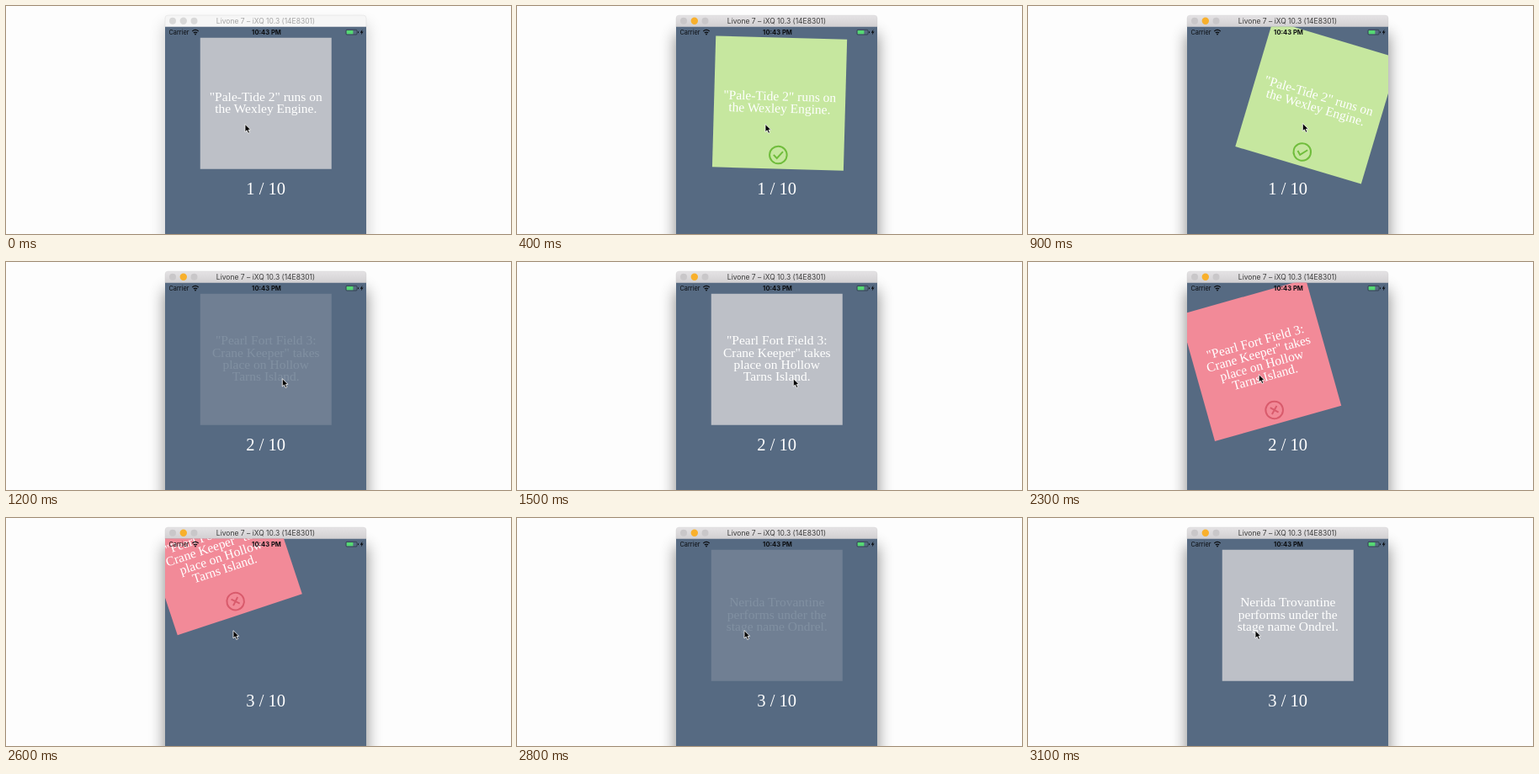
An HTML page that plays this animation: 600x271 px, repeating every 3800 ms.

```html
<!DOCTYPE html>
<html lang="en">
<head>
<meta charset="utf-8">
<title>Swipe quiz</title>
<style>
  html, body { margin: 0; width: 100%; height: 100%; overflow: hidden; background: #fdfdfd; }
  svg { display: block; width: 600px; height: 271px; }
  text { text-anchor: middle; }
  .ui { font-family: Inter, Roboto, sans-serif; }
  .quiz { font-family: "Liberation Serif", "Noto Serif", serif; fill: #fff; }
</style>
</head>
<body>
<svg viewBox="0 0 600 271">
  <defs>
    <filter id="blur" x="-30%" y="-30%" width="160%" height="160%"><feGaussianBlur stdDeviation="9"/></filter>
    <linearGradient id="bar" x2="0" y2="1">
      <stop stop-color="#e5e3e5"/><stop offset="1" stop-color="#d1cfd1"/>
    </linearGradient>
    <clipPath id="screen"><rect x="189" y="24.5" width="239" height="247"/></clipPath>
  </defs>

  <rect id="shadow" x="188" width="241" height="330" filter="url(#blur)"/>
  <path id="titlebar" d="M189 25V14.500q0-3.500 3.500-3.500h232q3.500 0 3.500 3.500V25z" stroke="#c8c8c8" stroke-width=".3"/>
  <circle class="dot" cx="198" cy="17.700" r="4"/>
  <circle class="dot" id="minimize" cx="210.800" cy="17.700" r="4.200"/>
  <circle class="dot" cx="223.500" cy="17.700" r="4"/>
  <text id="title" class="ui" x="308.500" y="21" font-size="8.500">Livone 7 – iXQ 10.3 (14E8301)</text>

  <g clip-path="url(#screen)">
    <rect x="189" y="24.500" width="239" height="247" fill="#566a82"/>
    <text id="counter" class="quiz" x="308.700" y="224" font-size="20.500"></text>
    <g id="card">
      <rect id="face" x="-78" y="-78" width="156" height="156"/>
      <g id="lines" class="quiz" font-size="15.500"></g>
      <g id="badge" transform="translate(0 61.500)" fill="none" stroke-width="2">
        <circle r="10.300"/><path id="mark"/>
      </g>
    </g>
    <g fill="#0b0d10">
      <text class="ui" x="205.500" y="34" font-size="7.400">Carrier</text>
      <text class="ui" x="309.500" y="34.200" font-size="7.600" font-weight="700">10:43 PM</text>
      <path d="M221.300 30q3.700-3.300 7.400 0M222.800 32q2.200-1.900 4.400 0" fill="none" stroke="#0b0d10" stroke-width="1.200"/>
      <circle cx="225" cy="33.500" r=".9"/>
      <rect x="404" y="28.300" width="13" height="5.700" rx="1" fill="none" stroke="#26313d" stroke-width=".7"/>
      <rect x="404.700" y="29" width="7.700" height="4.300" fill="#55d873"/>
      <path d="M418 30v2.300q1-.3 1-1.150t-1-1.150zM423.500 27.800l-2.700 3.900h1.700l-.7 2.800 2.800-3.900h-1.700z"/>
    </g>
  </g>
  <path id="cursor" d="M0 0V9.300L2.200 7.300 3.700 10.800 5.500 10 4 6.700H6.800z" fill="#000" stroke="#fff" stroke-width=".8"/>
</svg>
<script>
const LOOP = 3800, STEP = 100;
const REST = { x: 308.75, y: 115.75 };
const CARDS = [
  ['"Pale-Tide 2" runs on', 'the Wexley Engine.'],
  ['"Pearl Fort Field 3:', 'Crane Keeper" takes', 'place on Hollow', 'Tarns Island.'],
  ['Nerida Trovantine', 'performs under the', 'stage name Ondrel.']
];
// Times are in steps of 100 ms; grabX and grabY are where the drag begins.
const SWIPES = [
  { start: 3, release: 9, grabX: 291.7, grabY: 140.7, dir: 1 },
  { start: 19, release: 25, grabX: 307, grabY: 132.7, dir: -1 }
];
const POINTER = [
  [0, 284, 140.5], [2, 284, 140.5], [4, 295, 140.5], [9, 326.3, 139.5],
  [10, 328.3, 138.7], [19, 328.3, 138.7], [20, 307, 132.7], [23, 274.3, 133.7], [24, 270, 133.7]
];
const LOOKS = {
  0: { face: '#bdc0c7', badge: 'none', mark: '' },
  1: { face: '#c6e79f', badge: '#70bd3c', mark: 'M-5.500 0L-1.500 4 5.500-4' },
  [-1]: { face: '#f28a98', badge: '#d95b6c', mark: 'M-4-4L4 4M4-4L-4 4' }
};

const $ = id => document.getElementById(id);
const clamp = v => Math.min(1, Math.max(0, v));
const set = (el, attrs) => { for (const k in attrs) el.setAttribute(k, attrs[k]); };

function pointerAt(t) {
  const i = POINTER.findIndex(p => p[0] > t);
  if (i < 0) return POINTER[POINTER.length - 1].slice(1);
  const a = POINTER[i - 1], b = POINTER[i], k = (t - a[0]) / (b[0] - a[0]);
  return [1, 2].map(n => a[n] + (b[n] - a[n]) * k);
}

function drawWindow(active) {
  set($('shadow'), { y: active ? 33 : 22, opacity: active ? .43 : .2 });
  set($('titlebar'), { fill: active ? 'url(#bar)' : '#f6f6f6' });
  set($('title'), { fill: active ? '#3c3c3c' : '#a5a5a5' });
  document.querySelectorAll('.dot').forEach(dot => set(dot, { fill: active ? '#c9c7c9' : '#d8d8d8' }));
  if (active) set($('minimize'), { fill: '#f8b02c' });
}

function drawText(lines) {
  $('lines').replaceChildren(...lines.map((line, i) => {
    const el = document.createElementNS('http://www.w3.org/2000/svg', 'text');
    set(el, { y: (i - (lines.length - 1) / 2) * 14.4 + 4 });
    el.textContent = line;
    return el;
  }));
}

function drawCard(t, [px, py]) {
  const done = SWIPES.filter(s => t >= s.release + 3).length;
  const swipe = SWIPES[done], last = SWIPES[done - 1];
  let { x, y } = REST, angle = 0, dir = 0;
  // The card follows only once the pointer has passed the grab point.
  if (swipe && t >= swipe.start && (px - swipe.grabX) * swipe.dir > 0) {
    const drag = px - swipe.grabX, flight = Math.max(0, t - swipe.release);
    dir = swipe.dir;
    x += drag + dir * 18.5 * flight;
    y += py - swipe.grabY - 76 * flight;
    angle = drag * .48 + dir * .6 * flight;
  }
  const look = LOOKS[dir];
  set($('card'), {
    transform: `translate(${x} ${y}) rotate(${angle})`,
    opacity: last ? clamp((t - last.release - 2) / 4) : 1
  });
  set($('face'), { fill: look.face });
  set($('badge'), { stroke: look.badge });
  set($('mark'), { d: look.mark });
  drawText(CARDS[done]);
}

function draw(ms) {
  const t = Math.floor(ms % LOOP / STEP);
  const pointer = pointerAt(t);
  drawWindow(t >= 3);
  drawCard(t, pointer);
  $('counter').textContent = `${1 + SWIPES.filter(s => t > s.release).length} / 10`;
  set($('cursor'), { transform: `translate(${pointer})` });
}

const begin = performance.now();
function tick() {
  draw(performance.now() - begin);
  requestAnimationFrame(tick);
}
tick();
</script>
</body>
</html>
```
